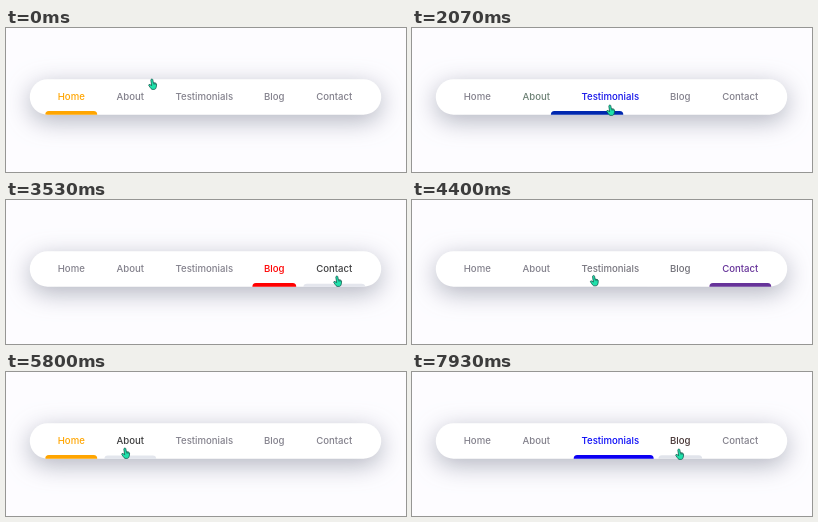
An HTML page that plays this animation: 400x144 px, repeating every 8 s.

```html
<!DOCTYPE html>
<html lang="en">
<head>
<meta charset="utf-8">
<title>Sliding navigation</title>
<style>
  html, body { margin: 0; width: 100%; height: 100%; overflow: hidden; background: #fdfcff; }
  svg { display: block; width: 100vw; height: 100vh; }
  text { font: 500 9.6px Inter, "Open Sans", sans-serif; text-anchor: middle; }
</style>
</head>
<body>
<svg viewBox="0 0 400 144">
  <defs>
    <clipPath id="pill"><rect x="23.8" y="51.2" width="351.4" height="35.5" rx="17.75"/></clipPath>
    <filter id="shadow" filterUnits="userSpaceOnUse" x="-60" y="-40" width="520" height="230" color-interpolation-filters="sRGB">
      <feDropShadow dx="0" dy="6.2" stdDeviation="12.4" flood-color="#9fa3b0" flood-opacity=".8"/>
    </filter>
  </defs>
  <rect x="23.8" y="51.2" width="351.4" height="35.5" rx="17.75" fill="#fff" filter="url(#shadow)"/>
  <g id="nav" clip-path="url(#pill)"></g>
  <g id="hand" stroke="#14554a" stroke-width=".8" stroke-linejoin="round" stroke-linecap="round">
    <path fill="#1fe2ab" d="M-1.3 .9C-1.3-.2 .7-.3 .9 .8L1.5 4 4 4.5Q5.2 4.9 5 6.5L4.6 9Q4.3 11 2.6 11.3H0Q-1.2 10.6-2 9.2L-3.6 6.9Q-3.6 5.5-2.2 6L-.7 7Z"/>
    <path fill="none" stroke-width=".5" d="M1.5 4l.2 1.6M2.8 4.3l.1 1.5M4 4.6v1.3"/>
  </g>
</svg>
<script>
const LOOP = 8000, SLIDE = 400, FADE = 300, TRAVEL = 260;
const LEFT = 39.3, GAP = 7.2, BAR_Y = 83.1;
const GREY = [131, 129, 140], DARK = [51, 51, 51];

const items = [
  { label: 'Home', w: 51.9, color: [255, 165, 0] },
  { label: 'About', w: 51.8, color: [0, 128, 0] },
  { label: 'Testimonials', w: 81.8, color: [0, 0, 255] },
  { label: 'Blog', w: 43.8, color: [255, 0, 0] },
  { label: 'Contact', w: 61.8, color: [102, 51, 153] }
];
items.reduce((x, it) => (it.x = x) + it.w + GAP, LEFT);
const [home, about, testimonials, blog, contact] = items;

// The pointer sets off at `leave`, rests at x, y and then clicks
const visits = [
  { item: home, leave: -2000, x: 146, y: 51, click: -1000 },
  { item: about, leave: 70, x: 124, y: 76, click: 715 },
  { item: testimonials, leave: 1150, x: 198, y: 77, click: 1910 },
  { item: blog, leave: 2275, x: 271, y: 79, click: 2985 },
  { item: contact, leave: 3250, x: 331, y: 76, click: 3915 },
  { item: home, leave: 4260, x: 66, y: 75, click: 4785 },
  { item: about, leave: 5480, x: 119, y: 76, click: 6115 },
  { item: testimonials, leave: 6490, x: 205, y: 80, click: 7050 },
  { item: blog, leave: 7345, x: 267, y: 77, click: 7905 }
];

const clamp = v => Math.min(1, Math.max(0, v));
const smooth = u => u * u * (3 - 2 * u);
const mix = (a, b, k) => a + (b - a) * k;
const mixRgb = (a, b, k) => a.map((v, i) => mix(v, b[i], k));
const rgb = c => `rgb(${c.map(Math.round)})`;
const bezier = (a, b, u) => 3 * a * u * (1 - u) ** 2 + 3 * b * u * u * (1 - u) + u ** 3;

// CSS "ease"
function ease(p) {
  if (p <= 0) return 0;
  if (p >= 1) return 1;
  let lo = 0, hi = 1;
  for (let i = 0; i < 20; i++) {
    const mid = (lo + hi) / 2;
    if (bezier(.25, .25, mid) < p) lo = mid; else hi = mid;
  }
  return bezier(.1, 1, lo);
}

// Latest visit whose `key` time has passed, and the one before it
function latest(key, t) {
  let i = visits.length - 1;
  while (i > 0 && visits[i][key] > t) i--;
  return [visits[Math.max(0, i - 1)], visits[i]];
}

function pointer(t) {
  const [from, to] = latest('leave', t);
  const k = smooth(clamp((t - to.leave) / TRAVEL));
  return [mix(from.x, to.x, k), mix(from.y, to.y, k)];
}

function stateAt(t) {
  const [x, y] = pointer(t);
  const active = latest('click', t)[1].item;
  const hover = items.find(it => it !== active && y > 52 && x >= it.x && x <= it.x + it.w);
  return { active, hover };
}

// Fades weigh the recent states by the slope of the easing curve
const STEPS = 60;
const weights = Array.from({ length: STEPS }, (_, k) => ease((k + 1) / STEPS) - ease(k / STEPS));

function fade(t) {
  for (const it of items) it.hover = it.active = 0;
  weights.forEach((w, k) => {
    const { active, hover } = stateAt(t - (k + .5) * FADE / STEPS);
    active.active += w;
    if (hover) hover.hover += w;
  });
}

const nav = document.getElementById('nav'), hand = document.getElementById('hand');

function set(el, attrs) {
  for (const name in attrs) el.setAttribute(name, attrs[name]);
  return el;
}
const add = (tag, attrs) =>
  nav.appendChild(set(document.createElementNS('http://www.w3.org/2000/svg', tag), attrs));

for (const it of items) {
  it.bar = add('rect', { x: it.x, width: it.w, height: 10, rx: 3.5, fill: '#dfe2ea' });
  it.text = add('text', { x: it.x + it.w / 2, y: 72.2 });
  it.text.textContent = it.label;
}
const indicator = add('rect', { y: BAR_Y, height: 10, rx: 3.5 });

function draw(t) {
  fade(t);
  for (const it of items) {
    set(it.bar, { y: BAR_Y + 3.7 * (1 - it.hover), opacity: it.hover });
    set(it.text, { fill: rgb(mixRgb(mixRgb(GREY, DARK, it.hover), it.color, it.active)) });
  }

  const [from, to] = latest('click', t);
  const a = from.item, b = to.item, p = ease((t - to.click) / SLIDE);
  set(indicator, { x: mix(a.x, b.x, p), width: mix(a.w, b.w, p), fill: rgb(mixRgb(a.color, b.color, p)) });

  set(hand, { transform: `translate(${pointer(t)}) scale(.92)` });
}

const start = performance.now();
function tick() {
  draw((performance.now() - start) % LOOP);
  requestAnimationFrame(tick);
}
tick();
</script>
</body>
</html>
```
